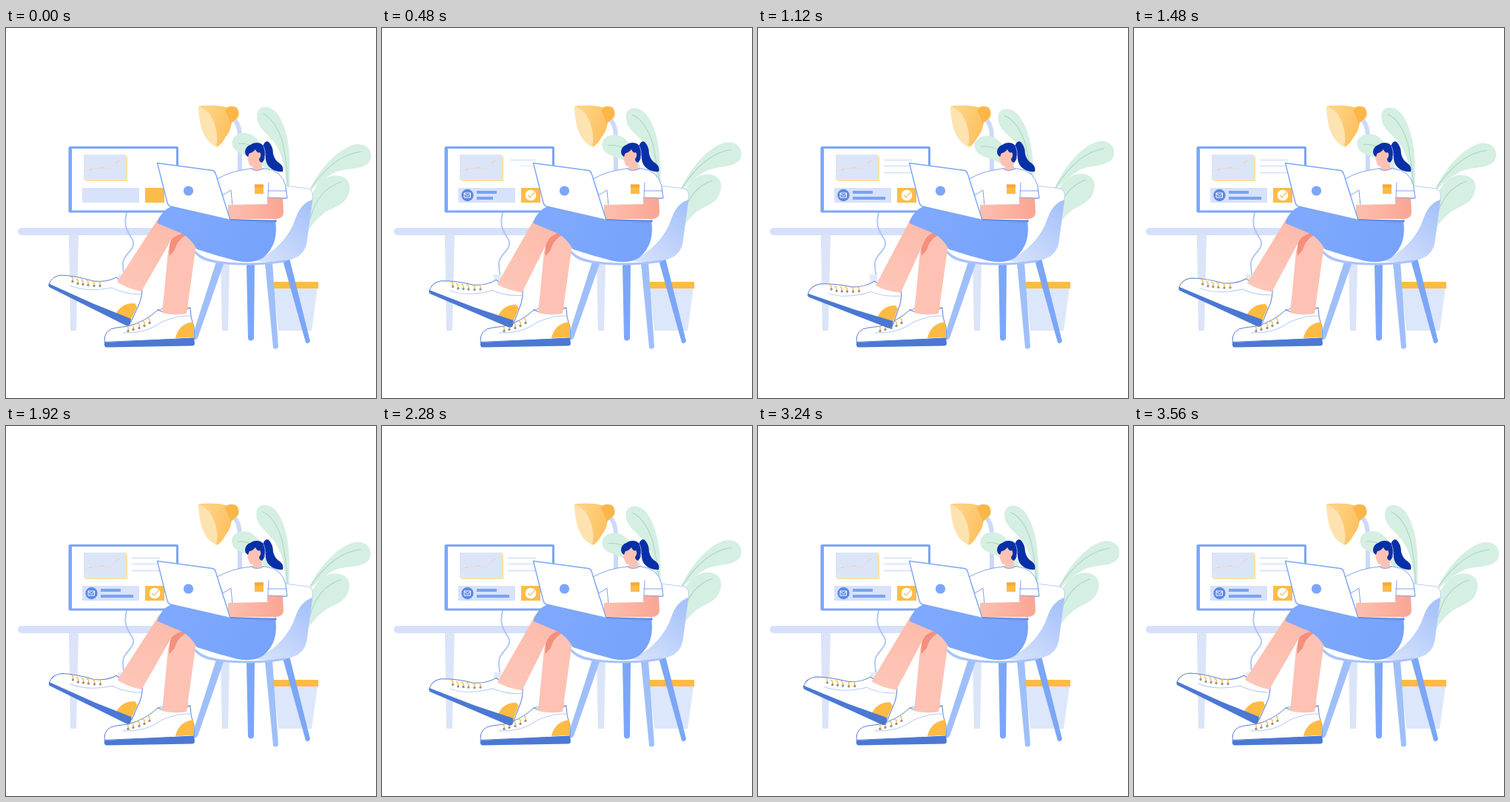
These frames come from a looping animation (500 by 500 pixels, 3.6 s). An HTML page with a canvas:

```html
<!DOCTYPE html>
<html lang="en">
<head>
<meta charset="utf-8">
<title>Working at a desk</title>
<style>
html, body { margin: 0; width: 100%; height: 100%; overflow: hidden; background: #fff; }
canvas { display: block; width: 500px; height: 500px; }
</style>
</head>
<body>
<canvas id="stage" width="500" height="500"></canvas>
<script>
const ctx = document.getElementById('stage').getContext('2d');
const LOOP = 3600, SWING = 1800, STEP = 40;
const C = {
  blue: '#7ca6f7', softBlue: '#9fbff9', skirt: '#7ea9fe', pale: '#d6e0f9', paleLeg: '#dbe4f9',
  line: '#7fa4ee', ink: '#5b80d6', sole: '#4b78d3', hair: '#0830a6', skin: '#fdc2b4',
  orange: '#fdbb43', leaf: '#d5efe2', vein: '#a9d5c1', cable: '#a9c4fa'
};

function fill(d, color) { ctx.fillStyle = color; ctx.fill(new Path2D(d)); }
function stroke(d, color, width = 1) {
  ctx.strokeStyle = color;
  ctx.lineWidth = width;
  ctx.stroke(new Path2D(d));
}
function shape(d, color, edge, width) { fill(d, color); stroke(d, edge, width); }
function rect(x, y, w, h, color) { ctx.fillStyle = color; ctx.fillRect(x, y, w, h); }
function ellipse(x, y, rx, ry, color) {
  ctx.beginPath();
  ctx.ellipse(x, y, rx, ry, 0, 0, Math.PI * 2);
  ctx.fillStyle = color;
  ctx.fill();
}
function rotated(x, y, angle, draw) {
  ctx.save();
  ctx.translate(x, y);
  ctx.rotate(angle);
  ctx.translate(-x, -y);
  draw();
  ctx.restore();
}
function scaled(x, y, s, draw) {
  if (s <= 0) return;
  ctx.save();
  ctx.translate(x, y);
  ctx.scale(s, s);
  draw();
  ctx.restore();
}
function ease(t, start, end) {
  const u = Math.min(1, Math.max(0, (t - start) / (end - start)));
  return u * u * (3 - 2 * u);
}
function gradient(x0, y0, x1, y1, from, to) {
  const g = ctx.createLinearGradient(x0, y0, x1, y1);
  g.addColorStop(0, from);
  g.addColorStop(1, to);
  return g;
}

function plant() {
  fill('M383 214C385 172 382 142 370 121C361 103 340 102 339 118C339 135 352 141 362 154C374 171 378 190 378 214Z', C.leaf);
  fill('M360 200C352 165 341 142 322 142C306 142 302 156 309 164C318 174 337 170 360 200Z', C.leaf);
  fill('M408 224C420 194 449 161 474 157C492 156 497 172 491 181C482 193 460 188 445 195C430 202 418 213 408 224Z', C.leaf);
  fill('M407 276C404 240 415 205 440 200C462 197 468 212 463 224C458 240 441 242 430 250C420 258 412 267 407 276Z', C.leaf);
  stroke('M348 116Q365 124 374 155Q379 180 381 212', C.vein);
  stroke('M314 156Q335 155 348 172', C.vein);
  stroke('M480 167Q444 171 412 216', C.vein);
  stroke('M453 208Q421 218 411 258', C.vein);
}

function pot() {
  fill('M362 351H421L413 409H368Z', '#dce7fc');
  rect(361, 343, 61, 9, C.orange);
}

function lamp() {
  stroke('M309 124Q316 132 316 148V192', '#cbd9fb', 6);
  fill('M260 105.5Q280 103 298 107L305 128Q303 140 297 147Q292 157 285 161Z', gradient(270, 120, 305, 130, '#fed184', '#fdc160'));
  fill('M260 106Q273 109 281 127Q288 146 284 161Q269 153 264 135Q260 120 260 106Z', '#fee2b0');
  fill('M296 111Q299 105 306 106Q313 106 314 112Q316 120 311 123L304 129Z', '#fcb748');
}

function desk() {
  fill('M85 279H98L95 409H87Z', C.paleLeg);
  fill('M290 316H302L300 409H292Z', C.paleLeg);
  ctx.beginPath();
  ctx.roundRect(16, 270, 224, 10, 5);
  ctx.fillStyle = C.pale;
  ctx.fill();
  stroke('M163 250C158 268 165 276 171 286C177 300 157 305 158 320Q158 328 160 336', C.cable, 1.8);
  rect(151, 333, 10, 12, '#e3eafb');
}

function screen(t) {
  ctx.beginPath();
  ctx.roundRect(84.5, 160, 148.5, 89.5, 2);
  ctx.fillStyle = C.blue;
  ctx.fill();
  rect(89, 163, 141, 83.5, '#fff');
  rect(107, 173, 57, 34, '#fee0a3');
  rect(105, 171, 57, 34, '#dce5f8');
  stroke('M107 193L114 191L130 189L140 191L150 181L158 178', '#f3d5bd', 0.8);
  for (const [x, y] of [[114, 191], [130, 189], [150, 181]]) ellipse(x, y, 1, 1, '#f4c9a6');

  [178, 186, 195].forEach((y, i) => {
    const p = ease(t, [290, 360, 460][i], [520, 580, 690][i]);
    ctx.globalAlpha = p;
    rect(208 - 38 * p, y - 0.5, 38 * p, 2, '#dce5fa');
    ctx.globalAlpha = 1;
  });

  rect(103, 216, 77, 20, '#d8e2fa');
  rect(188, 216, 26, 20, '#fcbc4a');
  scaled(115.5, 226, ease(t, 40, 300), () => {
    ellipse(0, 0, 8.2, 8.2, '#5d8be2');
    stroke('M-4 -3H4V3H-4ZM-4 -2L0 1L4 -2', '#fff');
  });
  rect(128, 220, 27 * ease(t, 160, 430), 4, '#7aa3f2');
  rect(128, 228, 44 * ease(t, 280, 680), 4, '#7aa3f2');
  scaled(201, 226, ease(t, 80, 340), () => {
    ellipse(0, 0, 7.3, 7.3, '#fff');
    stroke('M-3.5 0L-1 3L5 -4', '#f3c473', 1.2);
  });
}

function chair() {
  fill('M284 316H295L259 419Q255 424 251 419Z', C.softBlue);
  fill('M350 318L360 316L368 431Q365 436 361 432Z', C.softBlue);
  fill('M325 318H336L335 420Q331 425 327 420Z', C.blue);
  fill('M374 314L383 311L411 423Q409 428 405 425Z', C.blue);
  shape('M376 213L408 217Q416 219 414 231L406 290Q403 307 386 312Q330 325 272 315Q258 311 254 300Z', '#fff', '#b9cdfb');
  fill('M414 232Q398 237 391 258Q379 294 338 315Q366 319 387 312Q402 307 406 290Z',
    gradient(350, 312, 412, 238, '#d3e0fc', '#a5c1fa'));
  stroke('M256 303Q266 315 300 318Q340 321 376 315', '#a8c2fb', 3);
}

function laces(points) {
  for (const [x, y] of points) {
    stroke(`M${x - 2} ${y - 6}Q${x + 1} ${y - 5} ${x} ${y}`, '#f5b638', 1.3);
    ellipse(x, y + 0.5, 1.7, 1.7, '#9a968c');
  }
}

function restingLeg() {
  fill('M226 278H259L244 386Q228 390 211 386L219 302Z', C.skin);
  fill('M221 308Q219 288 228 279Q236 274 243 280Q231 287 228 300Z', '#f48f7c');
  shape('M133 424Q132 407 149 405L165 403Q188 397 205 381Q226 392 249 378Q249 392 254 404V419Z', '#fff', C.ink);
  stroke('M205 381Q226 375 249 378', C.ink, 0.8);
  fill('M212 374L246 374L244 386Q228 389 211 385Z', C.skin);
  stroke('M158 412Q188 414 211 397Q232 388 250 389', '#b4cafa');
  fill('M229 419Q233 400 253 397L254 418Z', C.orange);
  fill('M133 425L254 418.5L255 426Q255 429.5 251 429.5L136 431.5Q132 431 133 425Z', C.sole);
  laces([[165, 409], [172, 407], [180, 405], [187, 402], [194, 398]]);
}

function swingingLeg() {
  shape('M58 346Q62 335 75 334Q95 335 118 342Q136 344 149 337Q162 350 184 354Q183 368 178 377L169 397Z', '#fff', C.ink);
  fill('M208 254L150 343Q163 352 183 356L221 290Q225 281 238 278Z', gradient(205, 265, 165, 350, '#fdbcac', '#fdc6b8'));
  stroke('M86 348Q109 358 143 351Q161 360 182 360', '#b4cafa');
  fill('M148 387Q156 371 174 372L177 377L169 394Z', C.orange);
  fill('M58 345.5L118 372.5L169 393L168 400Q166 404 161 401.5L60 351Q56 349 58 345.5Z', C.sole);
  laces([[90, 342], [97, 345], [104, 346], [111, 347], [119, 348], [127, 348]]);
}

function woman() {
  shape('M285 204Q304 193 331 190H350Q373 192 378 214L380 230L364 232V260H303Z', '#fff', C.line);
  stroke('M285 204L293 226L304 219L306 240', C.line);
  fill('M353 229H374L375 250Q374 258 363 258H300V239L353 238Z', gradient(305, 245, 375, 252, '#fdbeae', '#faa592'));
  shape('M355 209L354 229L380 230L378 216', '#fff', C.line);
  stroke('M354 220L379 220', C.line);
  rect(336, 211.5, 12, 12.5, '#fdbb45');
  rect(336, 211.5, 12, 4, '#f5a931');

  fill('M347 160Q350 151 355 154Q361 160 361 170Q363 179 370 183Q376 188 374 194Q363 195 356 188Q350 182 351 173Q352 166 347 164Z', C.hair);
  fill('M328 168L340 162Q347 169 345 178L346 191Q339 195 332 191L334 187Q328 187 328 181Q325 179 328 168Z', C.skin);
  fill('M323 167Q324 160 330 158Q336 153 344 156Q351 160 351 168Q351 177 346 182Q342 181 342 177Q346 172 343 168Q340 170 337 164Q333 169 329 169L327 174Q323 172 323 167Z', C.hair);
  stroke('M348 160Q352 168 349 176', '#c9d6fa', 0.7);
  stroke('M331 190Q339 195 348 190', C.line);
}

function skirtAndLaptop() {
  fill('M205 261Q213 243 226 241L303 260H364Q369 292 348 310Q335 319 313 315Q285 308 258 299Q250 284 236 277L205 264Z',
    gradient(230, 250, 360, 315, C.skirt, '#76a2fb'));
  stroke('M303 259L365 261', '#5e8ae6', 2);
  ctx.setLineDash([4, 2]);
  stroke('M338 263H364', '#6d93e4', 1);
  ctx.setLineDash([]);
  shape('M204.5 182.5L279 192.5Q282 193 283 196L303 259.5L222 241Q219 240 218 236Z', '#fff', C.blue, 1.4);
  ellipse(246.5, 220, 6.6, 6.6, C.blue);
}

function draw(t) {
  const sway = (1 - Math.cos(t / SWING * Math.PI * 2)) / 2;
  rect(0, 0, 500, 500, '#fff');
  ctx.lineCap = ctx.lineJoin = 'round';
  lamp();
  rotated(390, 405, -0.06 * sway, plant);
  pot();
  desk();
  screen(t);
  chair();
  restingLeg();
  rotated(208, 250, -0.108 * sway, swingingLeg);
  woman();
  skirtAndLaptop();
}

function tick() {
  const t = performance.now() % LOOP;
  draw(Math.floor(t / STEP) * STEP);
  requestAnimationFrame(tick);
}
tick();
</script>
</body>
</html>
```
